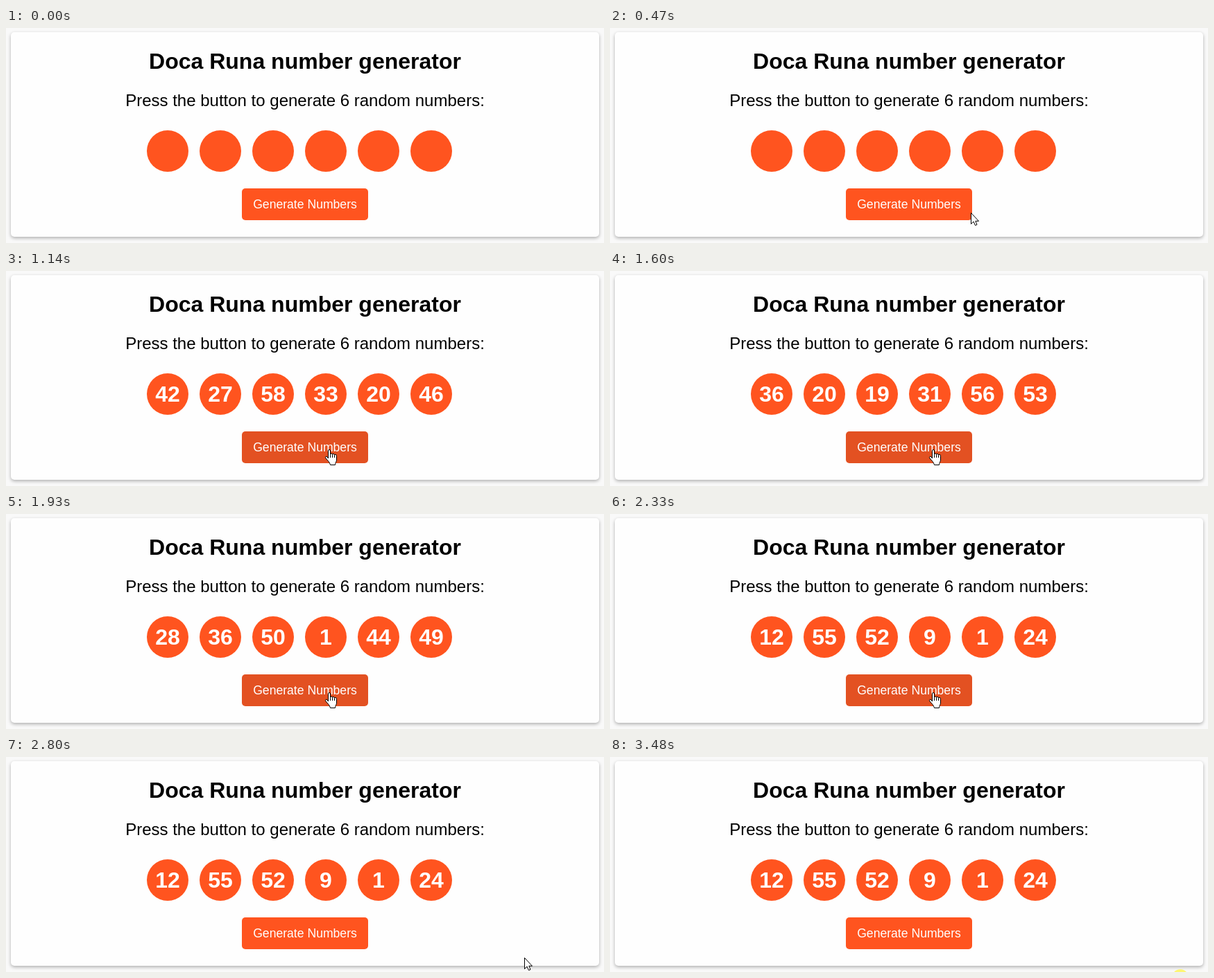
These frames come from a looping animation (862x311 px, 3.55 s). An HTML page:

```html
<!DOCTYPE html>
<html lang="en">
<head>
<meta charset="utf-8">
<title>Number generator</title>
<style>
  html, body { margin: 0; width: 100%; height: 100%; overflow: hidden; }
  body {
    position: relative;
    background: #f9f9f9;
    color: #000;
    font-family: "Liberation Sans", Arial, sans-serif;
  }
  body > * { position: absolute; box-sizing: border-box; }
  .card {
    left: 7px; top: 6px; width: 848px; height: 296px;
    border-radius: 5px;
    background: #fefefe;
    box-shadow: 0 2px 5px rgba(0, 0, 0, .3);
  }
  h1, p { left: 0; width: 862px; margin: 0; text-align: center; white-space: nowrap; }
  h1 { top: 30px; font: bold 32px/36px "Liberation Sans", Arial, sans-serif; }
  p { top: 91px; font-size: 24px; line-height: 27px; }
  .balls { left: 203px; top: 148px; display: flex; gap: 16px; }
  .balls span {
    width: 60px; height: 60px;
    border-radius: 50%;
    background: #ff541f;
    color: #fff;
    font-weight: bold; font-size: 32px; line-height: 60px;
    text-align: center;
  }
  button {
    left: 340px; top: 232px; width: 182px; height: 46px;
    margin: 0; padding: 0; border: 0; border-radius: 5px;
    background: #ff541f;
    color: #fff;
    font: 17.6px/46px "Liberation Sans", Arial, sans-serif;
    text-align: center; white-space: nowrap;
  }
  button.hover { background: #e35122; }
  .glow {
    left: 810px; top: 307px; width: 24px; height: 24px;
    border-radius: 50%;
    background: #fdf673;
  }
  svg { left: 0; top: 0; fill: #fff; stroke: #000; overflow: visible; pointer-events: none; }
</style>
</head>
<body>
<div class="card"></div>
<h1>Doca Runa number generator</h1>
<p>Press the button to generate 6 random numbers:</p>
<div class="balls"><span></span><span></span><span></span><span></span><span></span><span></span></div>
<button type="button">Generate Numbers</button>
<div class="glow"></div>
<svg id="arrow" width="13" height="20">
  <path d="M.5 .5V16.5L4 13L6.5 18.5L9 17.5L6.8 12.3H11.5Z"/>
</svg>
<svg id="hand" width="18" height="24">
  <path d="M4.5 13V2Q4.5 .5 6 .5T7.5 2V7.5Q7.5 6 9 6T10.5 7.5Q10.5 6.5 12 6.5T13.5 8.5Q13.5 7.5 15 7.5T16.5 9.5V15Q16.5 17 15.5 18.5T14.5 22.5H7.5Q7 20 5 17.5L1 13Q0 11.5 1 10.5T3 11Z"/>
  <path d="M7.5 7.5V12M10.5 7.5V12M13.5 8.5V12" fill="none"/>
</svg>
<script>
const LOOP = 3550;

const draws = [
  [0, []],
  [810, [15, 35, 11, 14, 18, 8]],
  [1140, [42, 27, 58, 33, 20, 46]],
  [1400, [29, 51, 34, 17, 45, 60]],
  [1600, [36, 20, 19, 31, 56, 53]],
  [1800, [47, 23, 38, 55, 26, 32]],
  [1930, [28, 36, 50, 1, 44, 49]],
  [2130, [54, 40, 25, 37, 59, 22]],
  [2330, [12, 55, 52, 9, 1, 24]]
];

// time, pointer shape, left, top
const pointerSteps = [
  [0, "none"],
  [190, "arrow", 706, 300],
  [270, "arrow", 655, 290],
  [330, "arrow", 607, 281],
  [400, "arrow", 558, 273],
  [470, "arrow", 520, 267],
  [550, "hand", 460, 258],
  [2470, "hand", 468, 258],
  [2530, "hand", 492, 258],
  [2600, "arrow", 530, 258],
  [2670, "arrow", 602, 265],
  [2730, "arrow", 680, 277],
  [2800, "arrow", 747, 290],
  [2930, "arrow", 757, 299],
  [3000, "none"]
];

const balls = document.querySelectorAll(".balls span");
const button = document.querySelector("button");
const glow = document.querySelector(".glow");
const pointers = ["arrow", "hand"].map(id => document.getElementById(id));

const stepAt = (steps, t) => steps.findLast(step => step[0] <= t);
const show = (el, on) => { el.style.visibility = on ? "visible" : "hidden"; };

function render(t) {
  const numbers = stepAt(draws, t)[1];
  balls.forEach((ball, i) => { ball.textContent = numbers[i] ?? ""; });

  const [, shape, x, y] = stepAt(pointerSteps, t);
  for (const pointer of pointers) {
    show(pointer, pointer.id === shape);
    pointer.style.transform = `translate(${x ?? 0}px, ${y ?? 0}px)`;
  }

  button.classList.toggle("hover", t >= 550 && t < 2670);
  show(glow, t >= 3480);
}

function tick(now) {
  render(now % LOOP);
  requestAnimationFrame(tick);
}

render(0);
requestAnimationFrame(tick);
</script>
</body>
</html>
```
